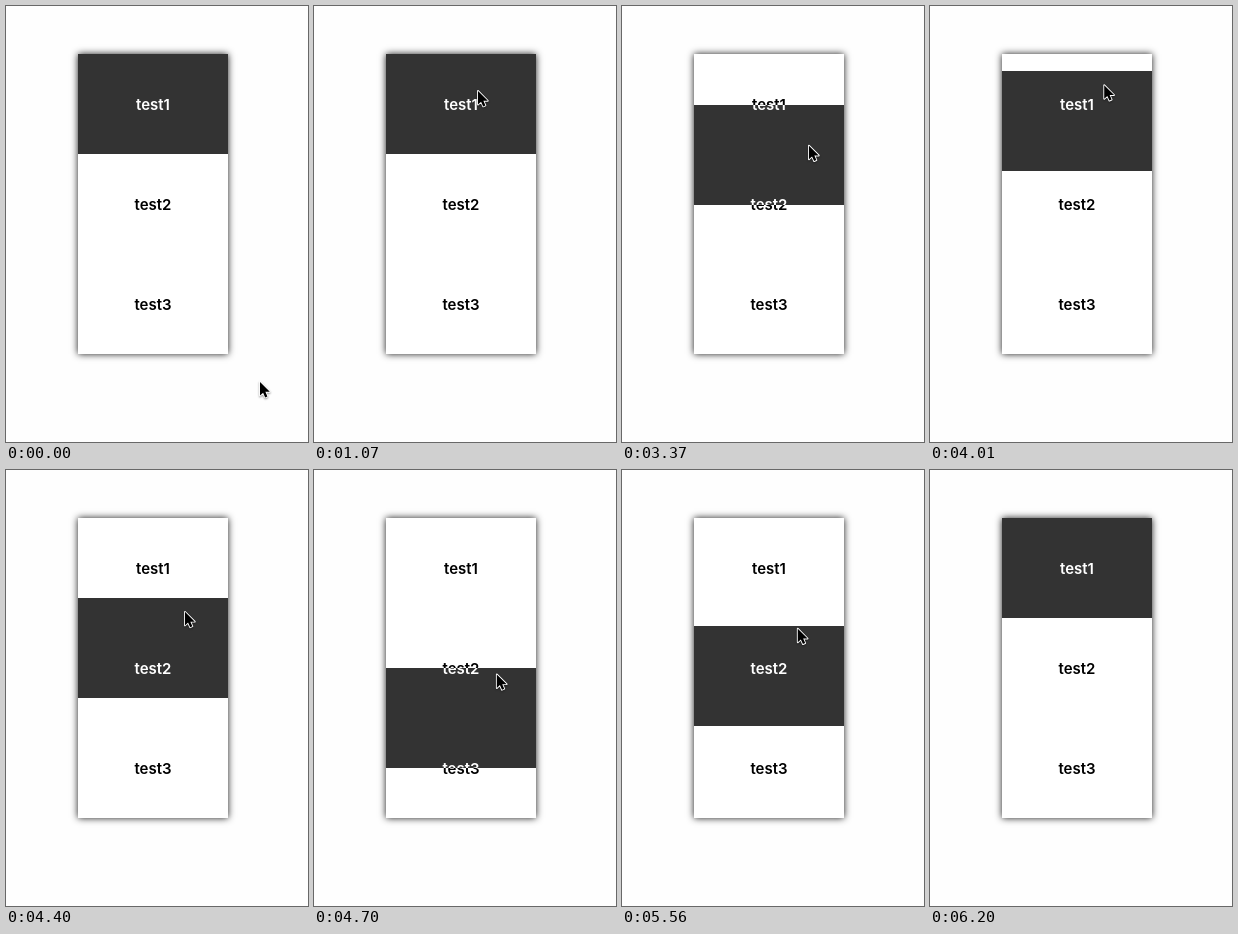
An HTML page with a canvas for the animation above (6.88 s loop, 302 px wide and 436 px high).

```html
<!DOCTYPE html>
<html lang="en">
<head>
<meta charset="utf-8">
<title>Drag highlight</title>
<style>
html, body { margin: 0; width: 100%; height: 100%; overflow: hidden; background: #fefefe; }
canvas { display: block; width: 302px; height: 436px; }
</style>
</head>
<body>
<canvas id="stage"></canvas>
<script>
const W = 302, H = 436, LOOP = 6880;
const box = { x: 72, y: 48, w: 150, h: 300 };
const ROW = 100;
const canvas = document.getElementById('stage');
const ctx = canvas.getContext('2d');
const dpr = window.devicePixelRatio || 1;
canvas.width = W * dpr;
canvas.height = H * dpr;

const home = { x: 253, y: 375, bar: box.y };

// Each move carries the pointer, and the bar while dragging, to a new place
const move = (from, to, x, y, bar, power = 1.5) => ({ from, to, x, y, bar, power });
const moves = [
  move(90, 250, 260, 414, 48),
  move(250, 770, 157, 119, 48),
  move(790, 1070, 163, 84, 48),
  move(1090, 1460, 167, 107, 59),
  move(1490, 2010, 169, 146, 99),
  move(2670, 2810, 180, 139, 99),
  move(3020, 3070, 186, 139, 99),
  move(3370, 3730, 172, 62, 48),
  move(3910, 4570, 180, 168, 156, 1),
  move(4600, 5170, 184, 246, 248, 3.1),
  move(5290, 5970, 164, 55, 48, 1.22),
  move(6000, 6200, 244, 257, 48, 1)
];
const leaves = moves[moves.length - 1].to - 5;

const mix = (a, b, u) => a + (b - a) * u;
const easeOut = (u, power) => 1 - Math.pow(1 - u, power);

function pose(t) {
  let p = home;
  for (const m of moves) {
    if (t < m.from) break;
    const u = easeOut(Math.min(1, (t - m.from) / (m.to - m.from)), m.power);
    p = { x: mix(p.x, m.x, u), y: mix(p.y, m.y, u), bar: mix(p.bar, m.bar, u) };
  }
  return p;
}

const arrow = new Path2D('M0 0V13.6L3.1 10.7L5.2 15.4L7.4 14.4L5.4 9.8H9.8Z');

function setShadow(color, blur, dy) {
  ctx.shadowColor = color;
  ctx.shadowBlur = blur * dpr;
  ctx.shadowOffsetY = dy * dpr;
}

function drawLabels(color) {
  ctx.fillStyle = color;
  for (let i = 0; i < 3; i++) {
    ctx.fillText('test' + (i + 1), box.x + box.w / 2, box.y + ROW * i + 55.5);
  }
}

function drawPointer(x, y) {
  ctx.save();
  ctx.translate(x + 1, y + 1);
  ctx.lineJoin = 'round';
  ctx.lineWidth = 1.8;
  ctx.strokeStyle = '#fff';
  setShadow('rgba(0,0,0,.4)', 2, 1);
  ctx.stroke(arrow);
  setShadow('transparent', 0, 0);
  ctx.fillStyle = '#000';
  ctx.fill(arrow);
  ctx.restore();
}

function draw(t) {
  const { x, y, bar } = pose(t);
  const top = Math.round(bar);

  ctx.setTransform(dpr, 0, 0, dpr, 0, 0);
  ctx.fillStyle = '#fefefe';
  ctx.fillRect(0, 0, W, H);

  ctx.save();
  setShadow('rgba(0,0,0,.9)', 7, 0);
  ctx.fillStyle = '#fff';
  ctx.fillRect(box.x, box.y, box.w, box.h);
  ctx.restore();

  ctx.font = '600 15px Inter, "Open Sans", sans-serif';
  ctx.textAlign = 'center';
  drawLabels('#000');

  ctx.save();
  ctx.beginPath();
  ctx.rect(box.x, top, box.w, ROW);
  ctx.clip();
  ctx.fillStyle = '#333';
  ctx.fillRect(box.x, top, box.w, ROW);
  drawLabels('#fff');
  ctx.restore();

  if (t < leaves) drawPointer(x, y);
}

const start = performance.now();
function tick() {
  draw((performance.now() - start) % LOOP);
  requestAnimationFrame(tick);
}
tick();
</script>
</body>
</html>
```
